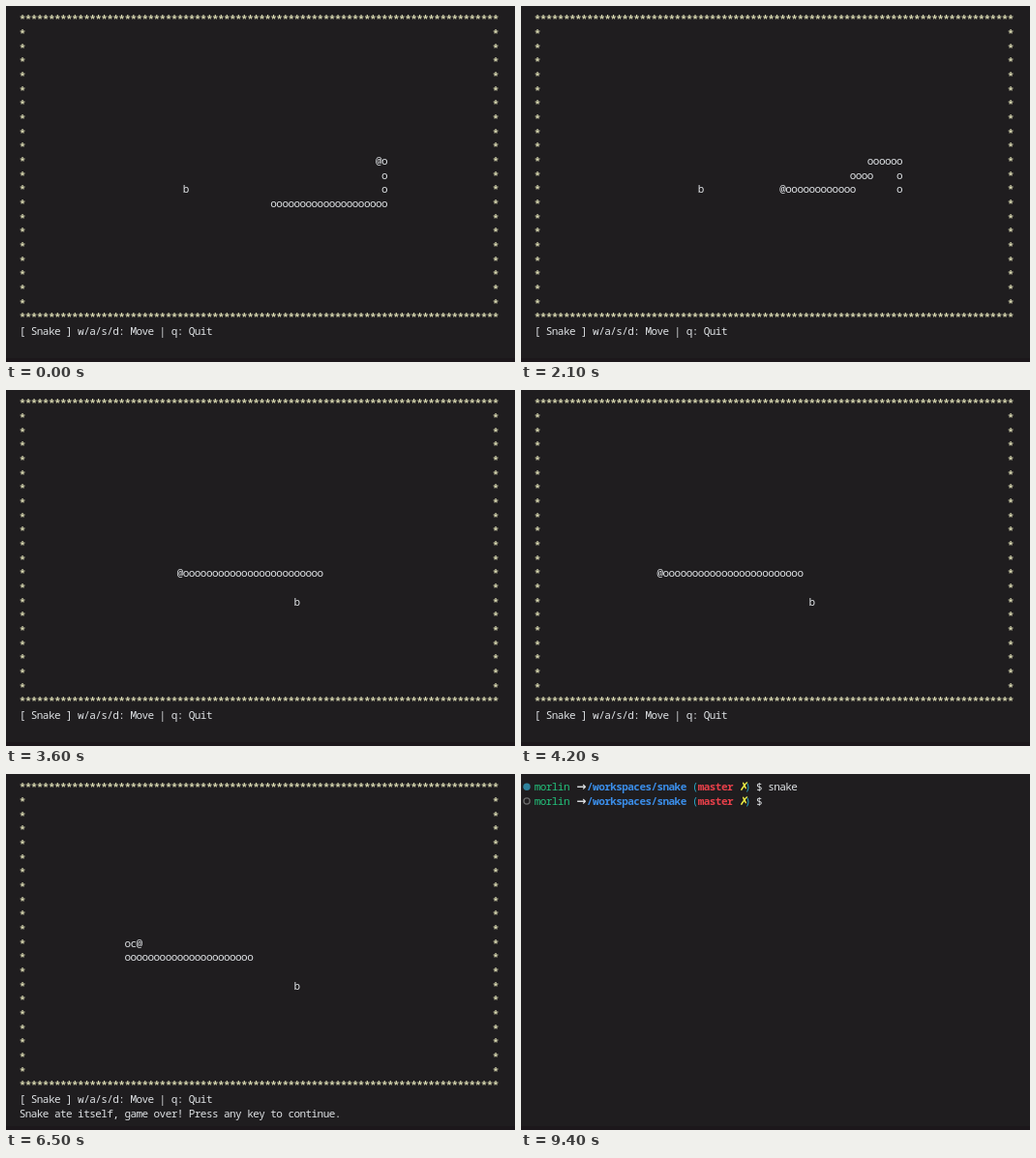
Recreate the animation shown at these times as an HTML page with a canvas. Size 526 px wide and 368 px high, loop 10000 ms.

```html
<!DOCTYPE html>
<html>
<head>
<meta charset="utf-8">
<title>Terminal snake</title>
<style>
html, body { margin: 0; width: 526px; height: 368px; overflow: hidden; background: #1f1d1f; }
canvas { display: block; }
</style>
</head>
<body>
<canvas id="screen" width="526" height="368"></canvas>
<script>
const ctx = document.getElementById('screen').getContext('2d');
const CELL = 6.037, LINE = 14.67, LEFT = 14, BASE = 17.2;
const LAST_COL = 81, LAST_ROW = 21;
const MONO = '11px "Noto Sans Mono", monospace';
const HEAVY = '600 ' + MONO;
const BOLD = 'bold ' + MONO;
const SYMBOL = 'bold 12px "DejaVu Sans", sans-serif';
const INK = '#dfe2e5', WALL = '#dcdcb4';
const STEP = 100, LOOP = 10000;
const EAT = 35, CRASH = 49, EXIT = 91;   // measured in steps

// Every cell the snake visits, from its first tail onward.
const path = [[43, 13]];
for (const [dx, dy, count] of [
  [1, 0, 19], [0, -1, 3], [-1, 0, 5], [0, 1, 1], [-1, 0, 3],
  [0, 1, 1], [-1, 0, 36], [0, -1, 1], [1, 0, 2]
]) {
  for (let i = 0; i < count; i++) {
    const [x, y] = path[path.length - 1];
    path.push([x + dx, y + dy]);
  }
}

// Each character is centred in its terminal cell.
function write(text, col, row, color = INK, font = MONO) {
  ctx.fillStyle = color;
  ctx.font = font;
  ctx.textAlign = 'center';
  [...text].forEach((ch, i) =>
    ctx.fillText(ch, LEFT + (col + i + 0.5) * CELL, BASE + row * LINE));
}

function drawWalls() {
  const star = (col, row) => write('*', col, row, WALL, HEAVY);
  for (let col = 0; col <= LAST_COL; col++) {
    star(col, 0);
    star(col, LAST_ROW);
  }
  for (let row = 1; row < LAST_ROW; row++) {
    star(0, row);
    star(LAST_COL, row);
  }
}

function drawGame(step) {
  drawWalls();
  write('b', ...(step < EAT ? [28, 12] : [47, 14]));

  const head = Math.min(step + 23, path.length - 1);
  const length = step < 14 ? 24 : 25;
  const crashed = step >= CRASH;
  for (let i = head - length + 1; i <= head; i++) {
    const ch = i === head ? '@' : crashed && i === head - 1 ? 'c' : 'o';
    write(ch, ...path[i]);
  }

  write('[ Snake ] w/a/s/d: Move | q: Quit', 0, 22);
  if (crashed) write('Snake ate itself, game over! Press any key to continue.', 0, 23);
}

function drawPrompt(row, command) {
  write('morlin', 0, row, '#23c47c');
  write('→', 7.5, row, INK, SYMBOL);
  write('/workspaces/snake', 9, row, '#3b8eea', BOLD);
  write('(', 27, row, '#29a5c4');
  write('master', 28, row, '#e8404a', BOLD);
  write(')', 36, row, '#29a5c4');
  write('✗', 35.4, row, '#f5f543', SYMBOL);
  write('$ ' + command, 38, row);
}

function dot(y, radius) {
  ctx.beginPath();
  ctx.arc(6, y, radius, 0, Math.PI * 2);
}

function drawShell() {
  dot(13.3, 3.7);
  ctx.fillStyle = '#2f829c';
  ctx.fill();
  dot(28, 3.1);
  ctx.strokeStyle = '#6a6a6a';
  ctx.lineWidth = 1.3;
  ctx.stroke();
  drawPrompt(0, 'snake');
  drawPrompt(1, '');
}

const start = performance.now();
function frame() {
  const step = Math.floor((performance.now() - start) % LOOP / STEP);
  ctx.fillStyle = '#1f1d1f';
  ctx.fillRect(0, 0, 526, 368);
  ctx.fillStyle = '#1c171b';
  ctx.fillRect(0, 364, 526, 4);
  if (step < EXIT) drawGame(step);
  else drawShell();
  requestAnimationFrame(frame);
}
frame();
</script>
</body>
</html>
```
